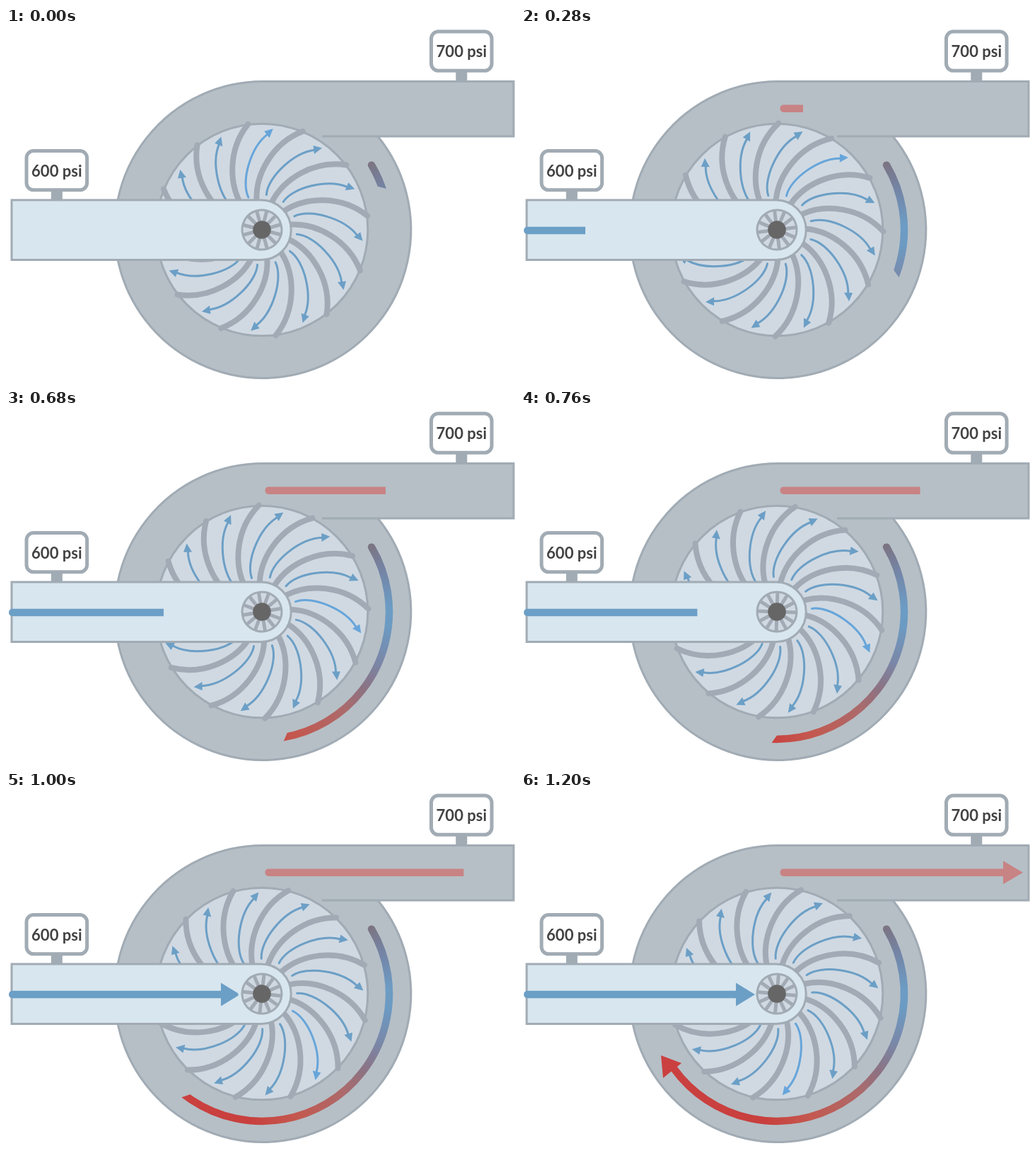
An HTML page with a canvas for the animation above (1240 ms loop, 720 by 500 pixels).

```html
<!DOCTYPE html>
<html lang="en">
<head>
<meta charset="utf-8">
<title>Centrifugal compressor</title>
<style>
html, body { margin: 0; overflow: hidden; background: #fff; }
canvas { display: block; }
</style>
</head>
<body>
<canvas id="stage" width="720" height="500"></canvas>
<script>
const ctx = document.getElementById('stage').getContext('2d');
const LOOP = 1240, STEP = 40, BLADES = 12;
const CX = 362, CY = 285;
const LINE = '#a1abb4', BLADE = '#a2aab5', CASING = '#b6bfc6', DISC = '#d0d9e2',
      PIPE = '#d8e6ef', BLUE = '#6c9fc6', BRIGHT = '#67a5da', RED = '#c88384';
const rad = deg => deg * Math.PI / 180;
const clock = deg => rad(deg - 90); // degrees clockwise from the top

const flowColor = ctx.createConicGradient(clock(0), CX, CY);
[[56, '#7d717b'], [71, '#7484a5'], [88, '#6c9cc4'], [97, '#6c9ac2'], [114, '#7b86a6'],
 [127, '#8c7282'], [140, '#ac6a6b'], [165, '#c4584f'], [185, '#c8403e'], [250, '#cb4040']]
  .forEach(([deg, color]) => flowColor.addColorStop(deg / 360, color));

function paint(path, fill, stroke, width = 3) {
  if (fill) { ctx.fillStyle = fill; ctx.fill(path); }
  if (stroke) { ctx.strokeStyle = stroke; ctx.lineWidth = width; ctx.stroke(path); }
}

function disc(r, fill, stroke) {
  const path = new Path2D();
  path.arc(0, 0, r, 0, 7);
  paint(path, fill, stroke);
}

function atCenter(deg, draw) {
  ctx.save();
  ctx.translate(CX, CY);
  ctx.rotate(rad(deg));
  draw();
  ctx.restore();
}

const casing = new Path2D('M447 153H718V75.5H363A209.5 209.5 0 1 0 526 153');
const pipe = new Path2D('M8 243H361A42 42 0 0 1 361 327.5H8Z');
const blade = new Path2D('M0 -150.5C-34 -118 -38 -68 -23 -36');
const flowLine = new Path2D('M-9.5 -135C-31 -114 -39 -64 -25 -43');
const flowHead = new Path2D('M-3 -143.5L-6.5 -130L-15 -138.5Z');
const spoke = new Path2D('M0 -10V-28');
const swirlHead = new Path2D('M198 372L227 383L201 404Z');
const swirl = new Path2D();
swirl.arc(CX, CY, 180, clock(59.5), clock(234));

function impeller(rot) {
  atCenter(0, () => disc(149.8, DISC, LINE));
  for (let i = 0; i < BLADES; i++) {
    const turn = rot + i * 360 / BLADES;
    const color = i ? BLUE : BRIGHT;
    ctx.lineCap = 'round';
    atCenter(turn, () => paint(blade, null, BLADE, 8));
    atCenter(turn + 15, () => {
      paint(flowLine, null, color);
      paint(flowHead, color);
    });
  }
  ctx.lineCap = 'butt';
}

function hub(rot) {
  atCenter(rot - 8, () => {
    disc(28, DISC);
    for (let i = 0; i < BLADES; i++) {
      paint(spoke, null, BLADE, 5);
      ctx.rotate(rad(360 / BLADES));
    }
    disc(28, null, LINE);
    disc(12.8, '#666');
  });
}

function gauge(x, y, label) {
  const box = new Path2D(), stem = new Path2D();
  stem.rect(x - 8, y + 28, 16, 14);
  box.roundRect(x - 42.8, y - 27.6, 85.6, 55.2, 10);
  paint(stem, LINE);
  paint(box, '#fff', LINE, 5);
  ctx.fillStyle = '#424242';
  ctx.font = 'bold 22px Lato, sans-serif';
  ctx.textAlign = 'center';
  ctx.fillText(label, x, y + 8.5);
}

// Straight arrow uncovered from the left up to edge
function straightArrow(left, neck, tip, y, color, edge) {
  if (edge <= left) return;
  ctx.save();
  ctx.beginPath();
  ctx.rect(0, 0, edge, 500);
  ctx.clip();
  const bar = new Path2D();
  bar.roundRect(left, y - 5.3, neck - left + 1, 10.6, [5, 0, 0, 5]);
  paint(bar, color);
  paint(new Path2D(`M${neck} ${y - 16.5}L${tip} ${y}L${neck} ${y + 16.5}Z`), color);
  ctx.restore();
}

// Curved arrow uncovered clockwise by a slanted edge
function swirlArrow(edge) {
  ctx.save();
  ctx.beginPath();
  ctx.arc(CX, CY, 205, clock(45), clock(edge + 5.6));
  ctx.arc(CX, CY, 155, clock(edge - 5.6), clock(45), true);
  ctx.clip();
  ctx.lineCap = 'round';
  paint(swirl, null, flowColor, 10.5);
  paint(swirlHead, flowColor);
  ctx.restore();
}

function draw(t) {
  const time = Math.max(t, 13) - 280;
  const rot = 30.9 + 0.1437 * time;
  ctx.clearRect(0, 0, 720, 500);
  paint(casing, CASING, LINE);
  impeller(rot);
  paint(pipe, PIPE, LINE);
  straightArrow(4, 304, 331, 286, BLUE, 91 + 0.33 * time);
  hub(rot);
  swirlArrow(109.2 + 0.148 * time);
  straightArrow(366.5, 682, 710, 113.7, RED, 399 + 0.345 * time);
  gauge(71.8, 201.2, '600 psi');
  gauge(644.3, 32.7, '700 psi');
}

function tick() {
  draw(Math.floor(performance.now() % LOOP / STEP) * STEP);
  requestAnimationFrame(tick);
}
tick();
</script>
</body>
</html>
```
